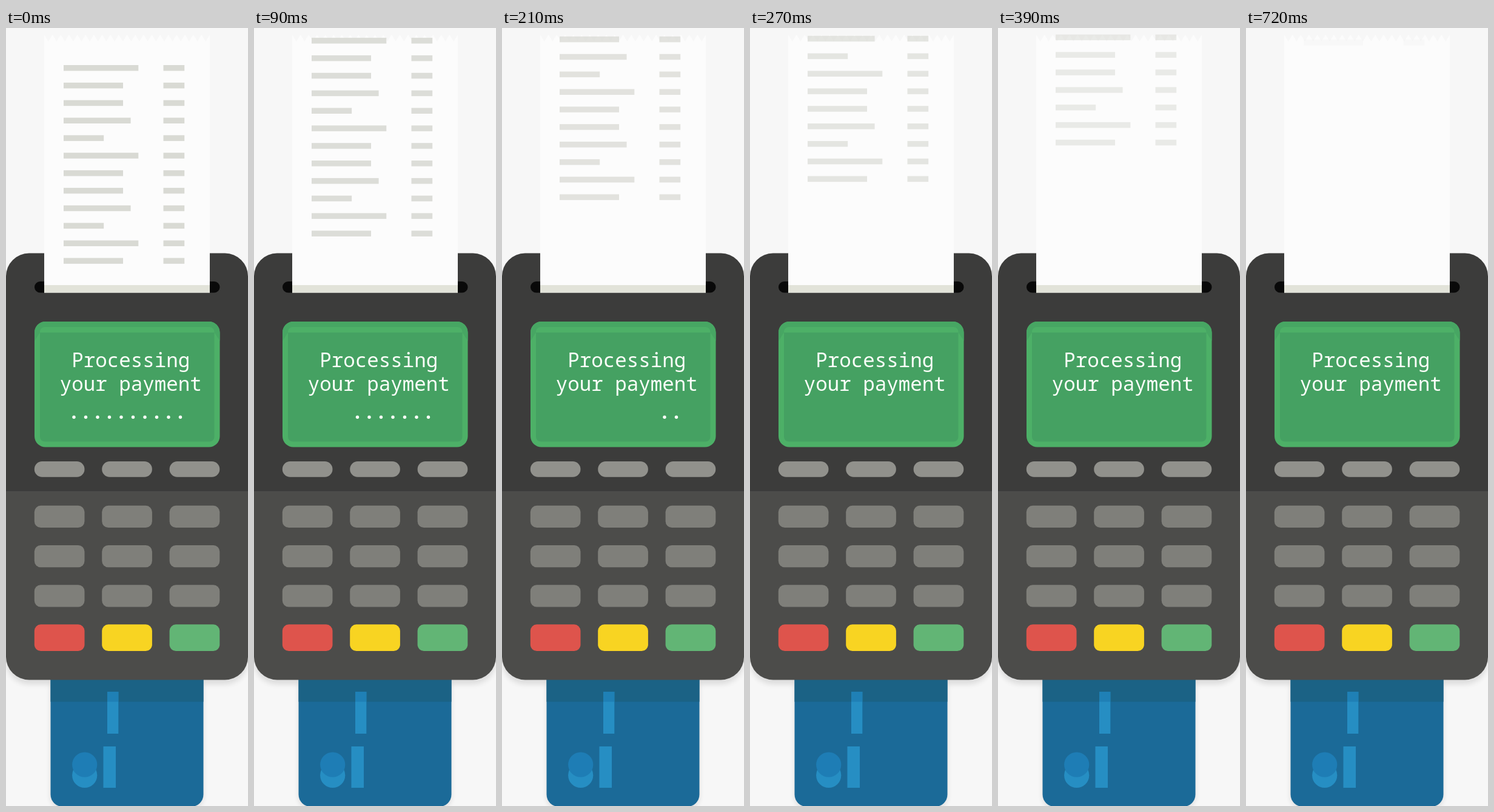
Write an HTML page that moves like this. It is 399 px wide and 1280 px high and loops after 0.93 s.

```html
<!DOCTYPE html>
<html lang="en">
<head>
<meta charset="utf-8">
<title>Card terminal</title>
<style>
  html, body { margin: 0; width: 100%; height: 100%; overflow: hidden; background: #f7f7f7; }
  svg { display: block; width: 399px; height: 1280px; }
  text { font: 300 32.5px "Noto Sans Mono", "Liberation Mono", monospace; fill: #fcfffa; text-anchor: middle; }
</style>
</head>
<body>
<svg id="stage" viewBox="0 0 399 1280">
  <defs>
    <filter id="soft" x="-10%" y="-10%" width="120%" height="120%"><feGaussianBlur stdDeviation="4"/></filter>
    <clipPath id="body"><rect y="370.5" width="399" height="702" rx="38"/></clipPath>
    <clipPath id="screen"><rect x="47" y="483" width="305.5" height="206.5" rx="18"/></clipPath>
  </defs>
  <rect width="399" height="1280" fill="#f7f7f7"/>

  <!-- card -->
  <g filter="url(#soft)" opacity=".1">
    <rect y="378" width="399" height="702" rx="38"/>
    <rect x="73.5" y="1060" width="252" height="225" rx="20"/>
  </g>
  <rect x="73.5" y="1040" width="252" height="241" rx="20" fill="#1b6a98"/>
  <rect x="73.5" y="1060" width="252" height="48.5" fill="#1b6285"/>
  <g fill="#268ec3">
    <rect x="167" y="1092" width="18.3" height="69"/>
    <rect x="160.5" y="1182" width="20.5" height="68"/>
    <circle cx="129.7" cy="1229.5" r="20.6"/>
  </g>
  <rect x="167" y="1092" width="18.3" height="16.5" fill="#1f80b6"/>
  <circle cx="129.7" cy="1212" r="20.6" fill="#1e7db5"/>

  <!-- terminal -->
  <g clip-path="url(#body)">
    <rect y="370" width="399" height="392" fill="#3c3c3b"/>
    <rect y="762" width="399" height="312" fill="#4c4c4a"/>
  </g>
  <rect x="47" y="417" width="305.5" height="18.5" rx="9.25" fill="#090909"/>
  <g clip-path="url(#screen)">
    <rect x="47" y="483" width="306" height="207" fill="#4db067"/>
    <path d="M47 483H353V515L343.5 501V500A8 8 0 0 0 335.5 492H64A8 8 0 0 0 56 500V501L47 515Z" fill="#47a663"/>
    <path d="M56 501H343.5V672.5A8 8 0 0 1 335.5 680.5H64A8 8 0 0 1 56 672.5Z" fill="#45a162"/>
  </g>
  <text x="205.7" y="558">Processing</text>
  <text x="205.7" y="597">your payment</text>
  <g id="dots" fill="#fcfffa"></g>
  <g id="keys"></g>

  <!-- receipt -->
  <path id="paper" fill="#fcfcfc"/>
  <rect x="63" y="423" width="273" height="12.5" fill="#e2e3d9"/>
  <g id="rows" fill="#d9dad4"></g>
</svg>
<script>
  const $ = id => document.getElementById(id);

  function add(parent, tag, attrs) {
    const el = document.createElementNS("http://www.w3.org/2000/svg", tag);
    for (const k in attrs) el.setAttribute(k, attrs[k]);
    return parent.appendChild(el);
  }
  const rect = (parent, x, y, width, height, rx = 0, fill) =>
    add(parent, "rect", fill ? { x, y, width, height, rx, fill } : { x, y, width, height, rx });

  // torn paper edge
  const TEETH = 20, PITCH = 273 / TEETH;
  let edge = "M63 435.5V11";
  for (let i = 0; i < TEETH; i++) {
    const x = 63 + i * PITCH;
    edge += `L${x + PITCH / 2} 22L${x + PITCH} 11`;
  }
  $("paper").setAttribute("d", edge + "V435.5Z");

  // printed lines
  const widths = [123.3, 98, 98, 110.6, 66.2];
  for (let i = 0; i < 12; i++) {
    const y = 61 + i * 28.85;
    rect($("rows"), 95, y, widths[i % 5], 9.5);
    rect($("rows"), 259.5, y, 34.7, 9.5);
  }

  // keypad: top, height, radius, colours
  const keyRows = [
    [713, 25.7, 12.8, ["#91918c"]],
    [785.8, 36.3, 10.5, ["#7f7f7a"]],
    [851, 36.3, 10.5, ["#7f7f7a"]],
    [916.2, 36.3, 10.5, ["#7f7f7a"]],
    [981.3, 43.7, 10.5, ["#de544c", "#f8d422", "#62b575"]]
  ];
  for (const [y, h, r, fills] of keyRows)
    for (let c = 0; c < 3; c++)
      rect($("keys"), 46.8 + c * 111.4, y, 82.7, h, r, fills[c % fills.length]);

  const dots = [];
  for (let i = 0; i < 10; i++)
    dots.push(add($("dots"), "circle", { cx: 112 + i * 19.5, cy: 640.3, r: 2.7 }));

  const LOOP = 930, STEP = 30, LAST = 24;

  function draw(ms) {
    const n = Math.min(LAST, Math.floor((ms % LOOP) / STEP));
    $("rows").setAttribute("transform", `translate(0 ${-14.97 * n})`);
    $("rows").setAttribute("opacity", 1 - n / 27);
    const gone = Math.floor(n * 1.2 + 1e-6);
    dots.forEach((d, i) => d.setAttribute("visibility", i < gone ? "hidden" : "visible"));
  }

  let start;
  function tick(now) {
    if (start === undefined) start = now;
    draw(Math.max(0, now - start));
    requestAnimationFrame(tick);
  }
  draw(0);
  requestAnimationFrame(tick);
</script>
</body>
</html>
```
